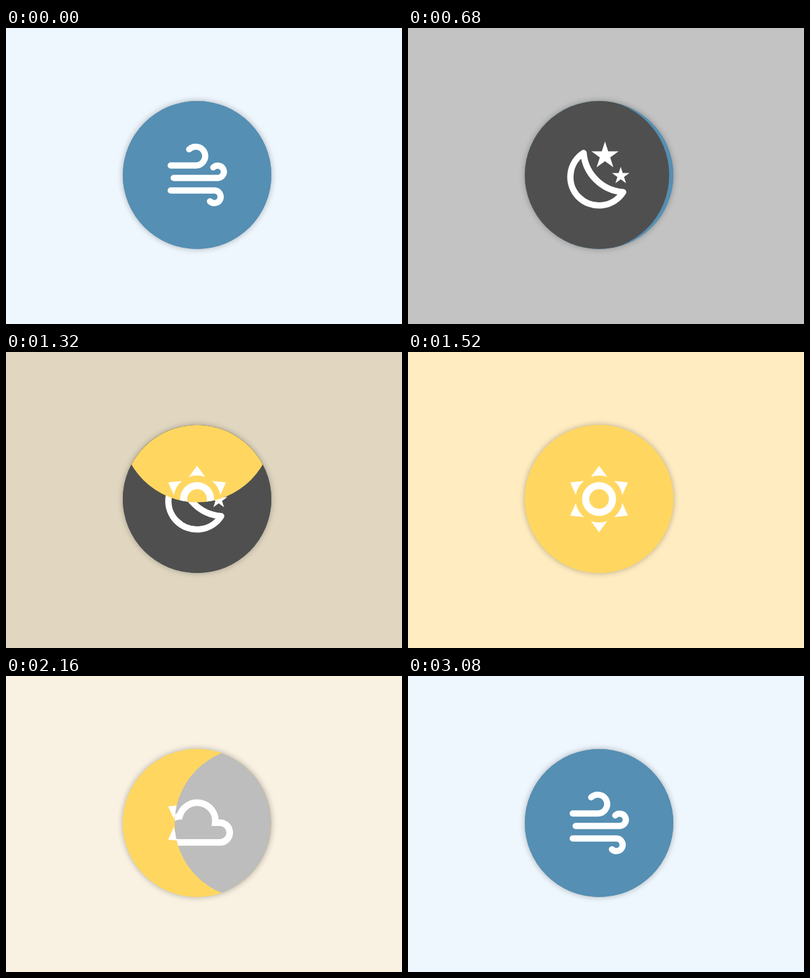
An HTML page with a canvas that plays this animation: 600x450 px, repeating every 3440 ms.

```html
<!DOCTYPE html>
<html lang="en">
<head>
<meta charset="utf-8">
<title>Weather icons</title>
<style>
  html, body { margin: 0; width: 100%; height: 100%; overflow: hidden; }
  canvas { display: block; width: 600px; height: 450px; }
</style>
</head>
<body>
<canvas width="600" height="450"></canvas>
<script>
const ctx = document.querySelector('canvas').getContext('2d');
const LOOP = 3440, STEP = 40, DURATION = 400;
const CX = 289.5, CY = 223.5, RADIUS = 112.5, WIPE_RADIUS = 115;
const TAU = Math.PI * 2;

const windPath = new Path2D(
  'M249.5 209H287A14.3 14.3 0 1 0 277.5 184.5' +
  'M254 228H320.5A9.4 9.4 0 1 0 314 212' +
  'M249.5 247H316A9.6 9.6 0 1 1 309 263.5');
const moonPath = new Path2D('M266 190A43.3 43.3 0 1 0 326 249.5A65 65 0 0 1 266 190Z');
const cloudPath = new Path2D(
  'M260 253A20 20 0 0 1 263 213.3A27.5 27.5 0 0 1 317 223H324A15 15 0 0 1 324 253Z');

function strokePath(path, width, join) {
  ctx.lineWidth = width;
  ctx.lineJoin = join;
  ctx.lineCap = 'round';
  ctx.stroke(path);
}

function star(x, y, r) {
  ctx.beginPath();
  for (let i = 0; i < 10; i++) {
    const a = i * TAU / 10, d = i % 2 ? r * 0.382 : r;
    ctx.lineTo(x + d * Math.sin(a), y - d * Math.cos(a));
  }
  ctx.fill();
}

function wind() { strokePath(windPath, 9.4, 'round'); }

function moon() {
  strokePath(moonPath, 9.6, 'round');
  star(298.5, 194.2, 21.6);
  star(322.3, 224.8, 13.8);
}

function sun() {
  ctx.lineWidth = 10.8;
  ctx.beginPath();
  ctx.arc(CX, CY, 20.3, 0, TAU);
  ctx.stroke();
  for (let i = 0; i < 6; i++) {
    const a = i * TAU / 6 - TAU / 4;
    ctx.beginPath();
    ctx.moveTo(CX + 50.5 * Math.cos(a), CY + 50.5 * Math.sin(a));
    ctx.arc(CX, CY, 35.7, a - 0.355, a + 0.355);
    ctx.fill();
  }
}

function cloud() { strokePath(cloudPath, 10, 'miter'); }

// dx, dy: the side from which each scene enters
const scenes = [
  { icon: wind,  disc: '#558fb3', sky: [239, 247, 254], start: 2671, dx: 0,  dy: 1 },
  { icon: moon,  disc: '#4f4f4f', sky: [193, 193, 193], start: 335,  dx: -1, dy: 0 },
  { icon: sun,   disc: '#ffd760', sky: [255, 236, 193], start: 1115, dx: 0,  dy: -1 },
  { icon: cloud, disc: '#bdbdbd', sky: [245, 245, 245], start: 1925, dx: 1,  dy: 0 }
];
const order = [1, 2, 3, 0];

// cubic-bezier(.42, 0, .58, 1)
function easeInOut(x) {
  if (x <= 0) return 0;
  if (x >= 1) return 1;
  let lo = 0, hi = 1;
  for (let i = 0; i < 24; i++) {
    const u = (lo + hi) / 2, v = 1 - u;
    if (1.26 * u * v * v + 1.74 * u * u * v + u * u * u < x) lo = u; else hi = u;
  }
  return lo * lo * (3 - 2 * lo);
}

function drawScene(scene) {
  ctx.fillStyle = scene.disc;
  ctx.beginPath();
  ctx.arc(CX, CY, RADIUS, 0, TAU);
  ctx.fill();
  ctx.fillStyle = ctx.strokeStyle = '#fff';
  scene.icon();
}

function draw(time) {
  let from = scenes[0], to = scenes[0], p = 1;
  for (const i of order) {
    if (time < scenes[i].start) break;
    from = to;
    to = scenes[i];
    p = easeInOut((time - to.start) / DURATION);
  }

  const sky = to.sky.map((c, i) => Math.round(from.sky[i] + (c - from.sky[i]) * p));
  ctx.fillStyle = `rgb(${sky})`;
  ctx.fillRect(0, 0, 600, 450);

  ctx.save();
  ctx.shadowColor = 'rgba(0,0,0,.3)';
  ctx.shadowBlur = 10;
  ctx.fillStyle = (p < 1 ? from : to).disc;
  ctx.beginPath();
  ctx.arc(CX, CY, RADIUS, 0, TAU);
  ctx.fill();
  ctx.restore();

  if (p < 1) drawScene(from);
  ctx.save();
  const offset = 2 * WIPE_RADIUS * (1 - p);
  ctx.beginPath();
  ctx.arc(CX + to.dx * offset, CY + to.dy * offset, WIPE_RADIUS, 0, TAU);
  ctx.clip();
  drawScene(to);
  ctx.restore();
}

const began = performance.now();
function tick() {
  const time = (performance.now() - began) % LOOP;
  draw(Math.floor(time / STEP) * STEP);
  requestAnimationFrame(tick);
}
tick();
</script>
</body>
</html>
```
